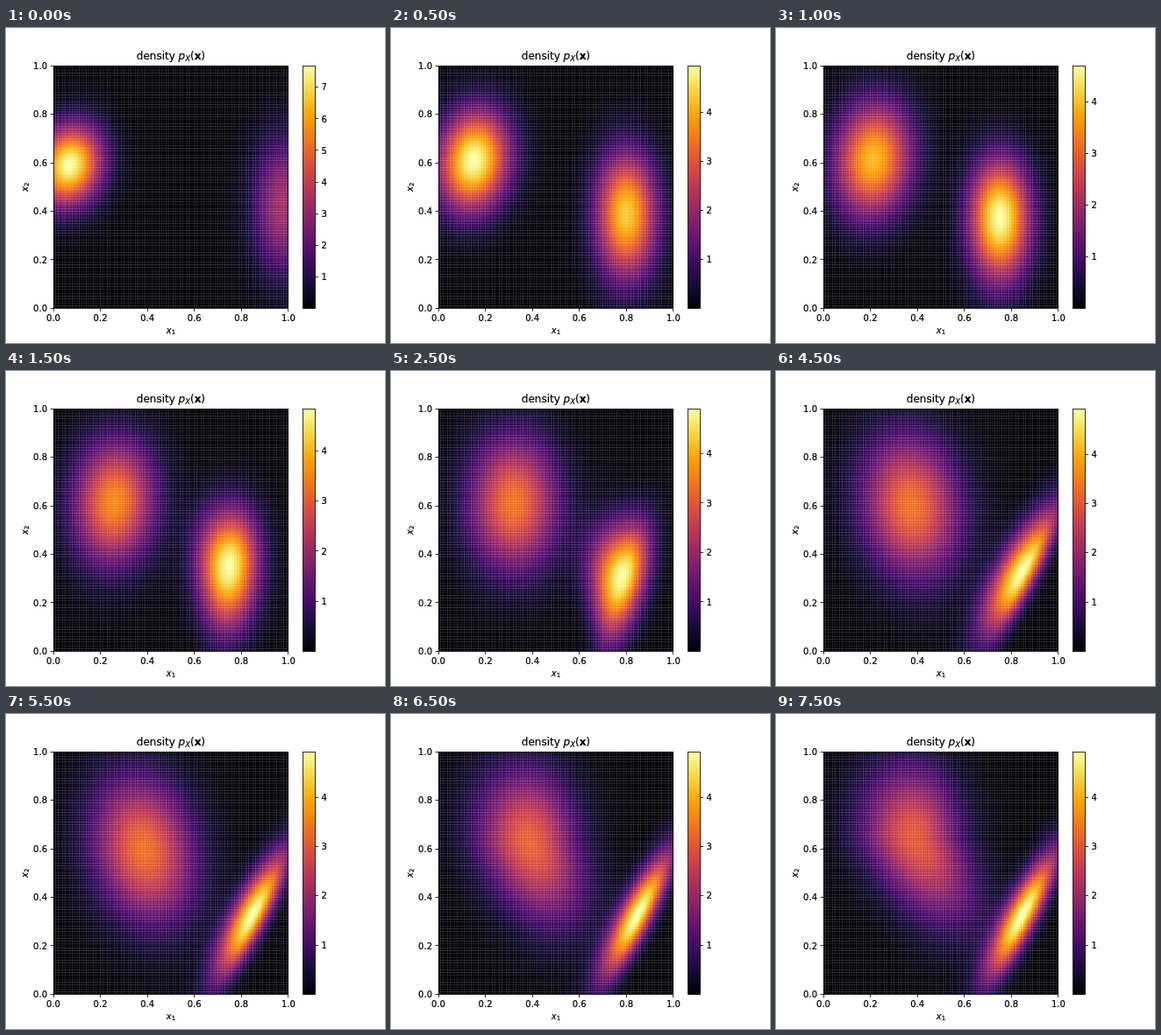
Write an HTML page with a canvas that moves like this. It is 432 px wide and 360 px high and loops after 8 s.

```html
<!DOCTYPE html>
<html lang="en">
<head>
<meta charset="utf-8">
<title>Density</title>
<style>
html, body { margin: 0; width: 100%; height: 100%; overflow: hidden; background: #fff; }
canvas { display: block; }
</style>
</head>
<body>
<canvas id="stage" width="432" height="360"></canvas>
<script>
const ctx = document.getElementById('stage').getContext('2d');
const FONT = '"DejaVu Sans", sans-serif';
const LOOP = 8000, STEP = 500, CELLS = 100;
const plot = { x: 54, y: 43.2, w: 267.84, h: 277.2 };
const bar = { x: 338.5, w: 14 };
const bottom = plot.y + plot.h;

// Inferno colours at even intervals
const inferno = ['000004', '160b39', '420a68', '6a176e', '932667', 'bc3754',
  'dd513a', 'f37819', 'fca50a', 'f6d746', 'fcffa4']
  .map(h => [0, 2, 4].map(i => parseInt(h.slice(i, i + 2), 16)));

const mix = (a, b, f) => a + (b - a) * f;
const clamp = v => Math.min(Math.max(v, 0), 1);

function smooth(t, from, to) {
  const f = clamp((t - from) / (to - from));
  return f * f * (3 - 2 * f);
}

function color(v) {
  const p = clamp(v) * 10;
  const i = Math.min(Math.floor(p), 9);
  const rgb = inferno[i].map((c, n) => Math.round(mix(c, inferno[i + 1][n], p - i)));
  return `rgb(${rgb})`;
}

// Both bumps settle exponentially; t is in seconds
function stateAt(t) {
  const glide = (from, to, tau) => mix(to, from, Math.exp(-t / tau));

  const late = smooth(t, 5, 7.5);
  const spread = glide(.095, .16, 3.2);
  const rise = glide(.115, .205, 1.3);
  const lean = .1 - .04 * t;
  const left = {
    peak: glide(7.68, 3.35, .5) - .3 * late,
    cx: glide(.068, .4, 1.75) - .01 * late,
    cy: glide(.59, .625, .5) - .006 * t + .065 * late,
    wl: spread, wr: spread * (1 - .12 * late),
    up: rise, down: rise + .03 * late,
    leanUp: lean + .15 * late, leanDown: lean - .23 * late,
    taper: 0
  };

  // The right bump tips over, fanning out halfway through
  const tip = smooth(t, .8, 4.5);
  const fan = tip * (1 - tip);
  const right = {
    peak: glide(3.3, 4.92, .5),
    cx: glide(.975, .73, .4) + .12 * tip,
    cy: glide(.42, .365, .6) - .035 * tip - .16 * fan,
    wl: .09 - .033 * smooth(t, 3, 6.5), wr: .09 - .044 * tip,
    up: glide(.195, .15, 1) + .025 * tip - .06 * fan, down: glide(.195, .172, 1),
    leanUp: .5 * tip, leanDown: .5 * tip,
    taper: 7 * fan
  };
  return { left, right, max: Math.max(left.peak, right.peak) };
}

// Gaussian bump with a separate spread on each side of a leaning axis
function bump(b, x, y) {
  const v = y - b.cy;
  const u = x - b.cx - v * (v > 0 ? b.leanUp : b.leanDown);
  const w = u < 0 ? b.wl * Math.max(.5, 1 + b.taper * v) : b.wr;
  const h = v > 0 ? b.up : b.down;
  return b.peak * Math.exp(-.5 * ((u / w) ** 2 + (v / h) ** 2));
}

function drawMesh({ left, right, max }) {
  const w = plot.w / CELLS, h = plot.h / CELLS;
  const edgeX = i => Math.round(plot.x + i * w);
  const edgeY = i => Math.round(plot.y + i * h);
  for (let r = 0; r < CELLS; r++) {
    for (let c = 0; c < CELLS; c++) {
      const x = (c + .5) / CELLS, y = 1 - (r + .5) / CELLS;
      ctx.fillStyle = color((bump(left, x, y) + bump(right, x, y)) / max);
      ctx.fillRect(edgeX(c), edgeY(r), edgeX(c + 1) - edgeX(c), edgeY(r + 1) - edgeY(r));
    }
  }
  // Seams show most where a cell edge falls in the middle of a pixel
  const seam = p => {
    const a = p - Math.floor(p);
    ctx.fillStyle = `rgba(255,255,255,${.55 * a * (1 - a)})`;
    return Math.floor(p);
  };
  for (let i = 1; i < CELLS; i++) {
    ctx.fillRect(seam(plot.x + i * w), 43, 1, 277);
    ctx.fillRect(54, seam(plot.y + i * h), 268, 1);
  }
}

function line(x1, y1, x2, y2) {
  ctx.beginPath();
  ctx.moveTo(x1, y1);
  ctx.lineTo(x2, y2);
  ctx.stroke();
}

// A hairline outline gives the type its weight
function ink(text, x, y) {
  ctx.fillText(text, x, y);
  ctx.save();
  ctx.lineWidth = .2;
  ctx.strokeText(text, x, y);
  ctx.restore();
}

function label(text, x, y, align) {
  ctx.font = `10px ${FONT}`;
  ctx.textAlign = align;
  ink(text, x, y);
}

// Runs of [text, size, style, drop], centred on x
function richText(runs, x, y) {
  const setFont = ([, size, style]) => { ctx.font = `${style} ${size}px ${FONT}`; };
  const widths = runs.map(run => { setFont(run); return ctx.measureText(run[0]).width; });
  let at = x - widths.reduce((a, b) => a + b) / 2;
  ctx.textAlign = 'left';
  runs.forEach((run, i) => {
    setFont(run);
    ink(run[0], at, y + (run[3] || 0));
    at += widths[i];
  });
}

const snap = v => Math.floor(v) + .5;

function drawAxes() {
  ctx.strokeStyle = ctx.fillStyle = '#000';
  ctx.lineWidth = .8;
  ctx.strokeRect(54.5, 43.5, 267, 277);
  for (let i = 0; i <= 5; i++) {
    const text = (i / 5).toFixed(1);
    const x = plot.x + plot.w * i / 5, y = bottom - plot.h * i / 5;
    line(snap(x), 320.5, snap(x), 324);
    line(50.5, snap(y), 54.5, snap(y));
    label(text, x, 335, 'center');
    label(text, 47, y + 3.7, 'right');
  }
  const mid = plot.x + plot.w / 2;
  richText([['density ', 12, 'normal'], ['p', 12, 'italic'], ['X', 8.4, 'italic', 2],
    ['(', 12, 'normal'], ['x', 12, 'bold'], [')', 12, 'normal']], mid, 36.3);
  const axisName = n => [['x', 10, 'italic'], [n, 7, 'normal', 1.6]];
  richText(axisName('1'), mid, 348.5);
  ctx.save();
  ctx.translate(24.5, plot.y + plot.h / 2);
  ctx.rotate(-Math.PI / 2);
  richText(axisName('2'), 0, 0);
  ctx.restore();
}

function drawBar(max) {
  const shade = ctx.createLinearGradient(0, bottom, 0, plot.y);
  for (let i = 0; i <= 10; i++) shade.addColorStop(i / 10, color(i / 10));
  ctx.fillStyle = shade;
  ctx.fillRect(bar.x, plot.y, bar.w, plot.h);
  ctx.fillStyle = '#000';
  ctx.strokeRect(bar.x, 43.5, bar.w, 277);
  for (let v = 1; v < max; v++) {
    const y = bottom - plot.h * v / max;
    line(352.5, snap(y), 356, snap(y));
    label(String(v), 359.4, y + 3.7, 'left');
  }
}

function draw(time) {
  const state = stateAt(time / 1000);
  ctx.fillStyle = '#fff';
  ctx.fillRect(0, 0, 432, 360);
  drawMesh(state);
  drawAxes();
  drawBar(state.max);
}

let shown = -1;
const start = performance.now();
function tick() {
  const time = (performance.now() - start) % LOOP;
  const step = Math.floor(time / STEP);
  if (step !== shown) {
    shown = step;
    draw(step * STEP);
  }
  requestAnimationFrame(tick);
}
tick();
</script>
</body>
</html>
```
